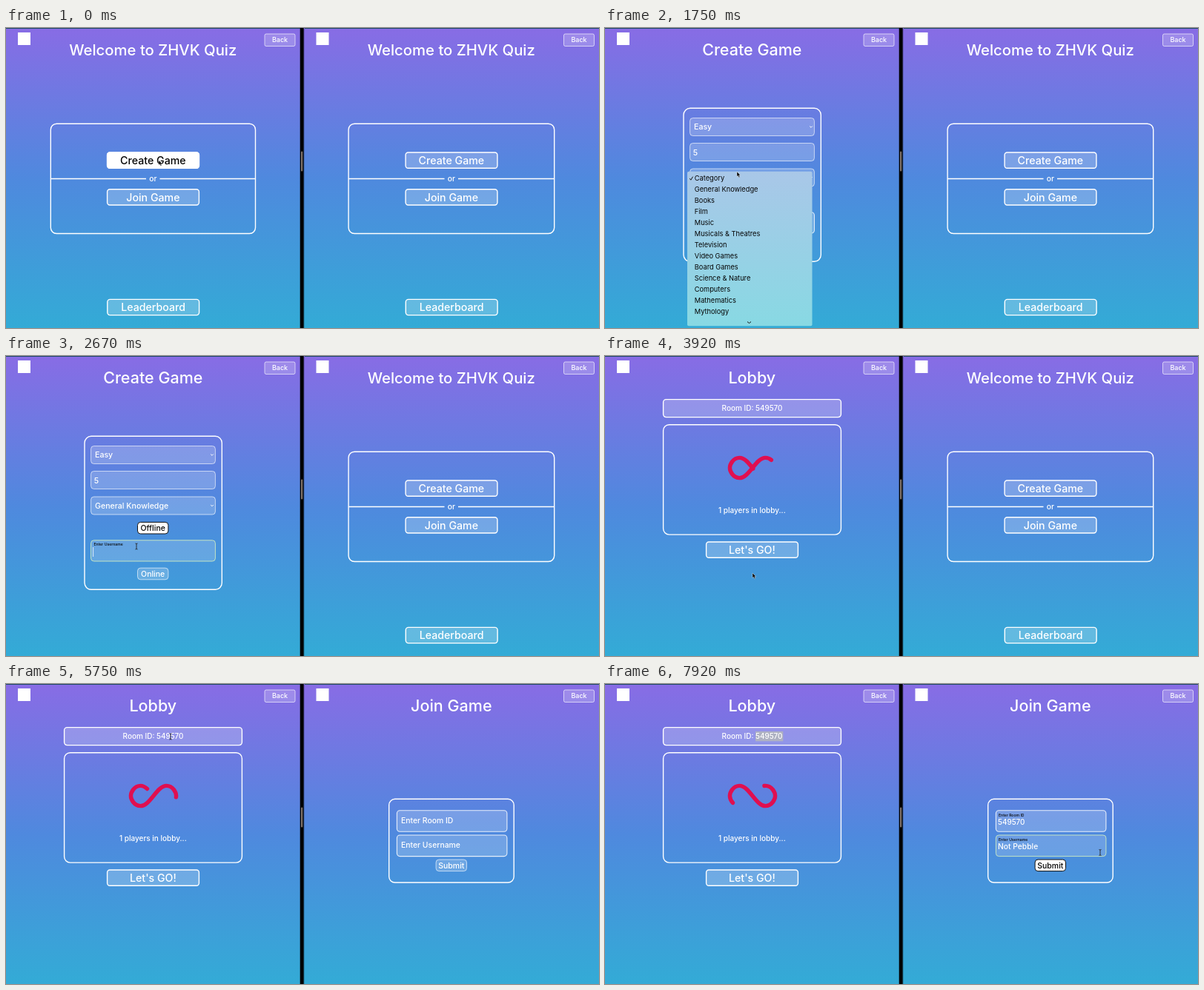
Recreate the animation shown at these times as an HTML page. Size 800x405 px, loop 8000 ms.

```html
<!DOCTYPE html>
<html lang="en">
<head>
<meta charset="utf-8">
<title>Quiz lobby</title>
<style>
  html, body { margin: 0; width: 100%; height: 100%; overflow: hidden; background: #000; }
  svg { display: block; width: 100vw; height: 100vh; font-family: Inter, "Open Sans", sans-serif; font-weight: 500; }
  text { fill: #fff; white-space: pre; }
  .mid { text-anchor: middle; }
  .end { text-anchor: end; }
  .dark { fill: #050505; }
  .menu { fill: #050505; font-weight: 400; }
  .frame { fill: none; stroke: #fff; stroke-width: 1.4; }
  .button { fill: #ffffff38; stroke: #fff; stroke-width: 1.4; }
  .field { fill: #ffffff33; stroke: #ffffffa0; stroke-width: 1; }
  .open { fill: #ffffff33; stroke: #ffffffd8; stroke-width: 1.1; }
  .focus { fill: #ffffff2b; stroke: #c3e4c4; stroke-width: 1; }
  .active { fill: #fff; stroke: #fff; stroke-width: 1.4; }
  .ready { fill: #fff; stroke: #111; stroke-width: 1; }
</style>
</head>
<body>
<svg id="stage" viewBox="0 0 800 405" preserveAspectRatio="none"></svg>
<script>
const LOOP = 8000, FRAME = 250 / 3;
const PATH_LENGTH = 256.6, GAP = 80, SPIN = 628;
const RIGHT = 402.5;

// Moments at which the interface changes
const T = {
  create: 330, levels: 660, easy: 1000, five: 1330, topics: 1670, topic: 2170,
  name: 2500, typeName: 2750, lobby: 3750, hoverJoin: 4900, join: 5170,
  select: 5830, roomFocus: 6420, paste: 6580, nick: 6830, typeNick: 6920, nickDone: 7580
};

const text = (x, y, size, str, cls = '') =>
  `<text x="${x}" y="${y}" font-size="${size}" class="${cls}">${str}</text>`;
const title = (str, size = 21.5) => text(198.3, 36.7, size, str, 'mid');
const box = (x, y, w, h, r, cls) =>
  `<rect x="${x}" y="${y}" width="${w}" height="${h}" rx="${r}" class="${cls}"/>`;
const during = (from, to, ...parts) =>
  `<g data-from="${from}" data-to="${to}">${parts.join('')}</g>`;
const typed = (x, y, str, from, to) =>
  `<text x="${x}" y="${y}" font-size="10.3" data-str="${str}" data-from="${from}" data-to="${to}"></text>`;
const caret = (x, y) => `<path d="M${x} ${y}v13" stroke="#fff" stroke-width=".8"/>`;
const chevron = (x, y) =>
  `<path d="M${x - 1.8} ${y - 1}l1.8 1.8 1.8-1.8" fill="none" stroke="#fff"/>`;

const bigButton = (x, y, label, cls = 'button') =>
  box(x + 0.4, y, 123.8, 21.2, 3.5, cls) +
  text(x + 62.2, y + 15.9, 14.2, label, cls === 'active' ? 'mid dark' : 'mid');
const smallButton = (x, y, label, ready) =>
  box(x + 0.3, y + 0.2, 41.4, 15.6, 4, ready ? 'ready' : 'field') +
  text(x + 21, y + 11.8, 10.5, label, ready ? 'mid dark' : 'mid');
const wideField = (y, h, cls) => box(114.6, y, 167.8, h, 4, cls);
const chooser = (y, label) =>
  wideField(y, 24, 'field') + text(120, y + 15.7, 10.6, label) + chevron(278, y + 12);

const chrome = backX =>
  '<rect width="398" height="405" fill="url(#sky)"/><rect width="398" height="1" fill="#1d4a63"/>' +
  '<rect x="16" y="6" width="17" height="17" fill="#fff"/>' +
  box(backX, 8, 41, 16.5, 2, 'field') + text(backX + 20.5, 19.3, 9, 'Back', 'mid');

const welcome = (width, extra) => {
  const left = 198.4 - width / 2;
  return title('Welcome to ZHVK Quiz', 20.3) +
    box(left, 129.2, width, 148.3, 8, 'frame') +
    `<path d="M${left} 203.5H189M207.5 203.5H${left + width}" class="frame"/>` +
    text(198.3, 207, 10.3, 'or', 'mid') +
    bigButton(136.2, 168, 'Create Game') + bigButton(136.2, 217.8, 'Join Game') +
    bigButton(136.4, 366.4, 'Leaderboard') + extra;
};

const menu = (y, height, fill, items) =>
  `<rect x="111" y="${y}" width="168.5" height="${height}" rx="2" fill="url(#${fill})"/>` +
  `<path d="M114.3 ${y + 9.5}l1.5 2 2.7-4.5" fill="none" stroke="#111"/>` +
  items.map((item, i) => text(120.8, y + 12.6 + i * 15, 9.25, item, 'menu')).join('');

const levels = ['Difficulty', 'Easy', 'Medium', 'Hard'];
const topics = ['Category', 'General Knowledge', 'Books', 'Film', 'Music', 'Musicals &amp; Theatres',
  'Television', 'Video Games', 'Board Games', 'Science &amp; Nature', 'Computers', 'Mathematics', 'Mythology'];

const createPage = () => during(T.create, T.lobby,
  title('Create Game'),
  box(106, 108.3, 185.3, 207, 9, 'frame'),
  during(0, T.easy, chooser(121.5, 'Difficulty')),
  during(T.easy, LOOP, chooser(121.5, 'Easy')),
  wideField(155.5, 24, 'field'),
  during(0, T.five, text(120, 171.2, 10.6, 'Number of Questions')),
  during(T.five, LOOP, text(118.7, 171.5, 10.6, '5')),
  during(0, T.topic, chooser(190, 'Category')),
  during(T.topic, LOOP, chooser(190, 'General Knowledge')),
  during(0, T.topic, smallButton(177.2, 224.2, 'Offline')),
  during(T.topic, LOOP, smallButton(177.2, 224.2, 'Offline', true)),
  during(0, T.name, wideField(248.8, 28.2, 'open'), text(120, 266.2, 10.4, 'Enter Username')),
  during(T.name, LOOP,
    wideField(248.8, 28.2, 'focus'), text(118.5, 256.2, 5.1, 'Enter Username', 'dark')),
  during(T.name, T.typeName, caret(117.6, 258)),
  typed(118, 268.3, 'Pebble', T.typeName, 3250),
  during(0, T.typeName, smallButton(177.2, 286, 'Online')),
  during(T.typeName, LOOP, smallButton(177.2, 286, 'Online', true)),
  during(T.levels, T.easy, menu(125, 64.3, 'levelFill', levels)),
  during(T.topics, T.topic, menu(193.7, 208.5, 'topicFill', topics),
    '<path d="M192 396.5l2.5 2 2.5-2" fill="none" stroke="#111"/>'));

const loop = 'M24.3 30C11.4 30 5 43.3 5 50s6.4 20 19.3 20c19.3 0 32.1-40 51.4-40' +
  'C88.6 30 95 43.3 95 50s-6.4 20-19.3 20C56.4 70 43.6 30 24.3 30z';

const lobbyPage = () => during(T.lobby, LOOP,
  title('Lobby'),
  box(78.6, 58.6, 239.8, 24, 4, 'button'),
  during(T.select, LOOP, '<rect x="203" y="64" width="37.3" height="13.3" fill="#aeb1c2"/>'),
  text(200.5, 74.3, 10, 'Room ID:', 'end'), text(203, 74.3, 9.9, '549570'),
  box(78.6, 92.7, 239.8, 148.4, 8, 'frame'),
  `<path id="spinner" d="${loop}" pathLength="${PATH_LENGTH}" transform="translate(165 117) scale(.68)"
    fill="none" stroke="#e00f50" stroke-width="8" stroke-linecap="round"
    stroke-dasharray="${PATH_LENGTH - GAP} ${GAP}"/>`,
  text(198.3, 212.3, 10, '1 players in lobby...', 'mid'),
  bigButton(136.2, 251, "Let's GO!"));

const entry = (y, label, cls) =>
  box(527.4, y, 148.5, 28.6, 4, cls) + text(531, y + 8, 5.1, label, 'dark');
const blank = (y, label) =>
  box(527.4, y, 148.5, 28.6, 4, 'open') + text(533, y + 17.2, 10.4, label);

const joinPage = () => during(T.join, LOOP,
  `<g transform="translate(${RIGHT})">${title('Join Game')}</g>`,
  box(516.7, 155.3, 168.5, 112.7, 8, 'frame'),
  during(0, T.roomFocus, blank(170.7, 'Enter Room ID')),
  during(T.roomFocus, T.nick, entry(170.7, 'Enter Room ID', 'focus')),
  during(T.nick, LOOP, entry(170.7, 'Enter Room ID', 'open')),
  during(T.roomFocus, T.paste, caret(530, 180)),
  during(T.paste, LOOP, text(530, 189.7, 9.9, '549570')),
  during(T.paste, T.nick, caret(567.8, 180)),
  during(0, T.nick, blank(204, 'Enter Username')),
  during(T.nick, LOOP, entry(204, 'Enter Username', 'focus')),
  during(T.nick, T.typeNick, caret(530, 213)),
  typed(530, 222.9, 'Not Pebble', T.typeNick, T.nickDone),
  during(0, T.typeNick, smallButton(579.8, 236.8, 'Submit')),
  during(T.typeNick, LOOP, smallButton(579.8, 236.8, 'Submit', true)));

const gradient = (id, ...colors) =>
  `<linearGradient id="${id}" x2="0" y2="1">` +
  colors.map((c, i) => `<stop offset="${i / (colors.length - 1)}" stop-color="${c}"/>`).join('') +
  '</linearGradient>';

const stage = document.getElementById('stage');
stage.innerHTML = `<defs>
    ${gradient('sky', '#886ce5', '#4f89de', '#33abd6')}
    ${gradient('levelFill', '#bfc5e2', '#abc8e3')}
    ${gradient('topicFill', '#a9c7e8', '#88d9e3')}
  </defs>
  ${chrome(349)}
  ${during(0, T.create, welcome(276.2, bigButton(136.2, 168, 'Create Game', 'active')))}
  ${createPage()}${lobbyPage()}
  <g transform="translate(${RIGHT})">${chrome(350)}
    ${during(0, T.join, welcome(277.6,
      during(T.hoverJoin, T.join, bigButton(136.2, 217.8, 'Join Game', 'active'))))}
  </g>
  ${joinPage()}
  <rect x="396.7" width="5" height="405"/>
  <rect x="401.7" width="1" height="405" fill="url(#sky)"/>
  <rect x="398" y="166.5" width="2.2" height="27" rx="1" fill="#80746c"/>
  <g id="pointer">
    <circle id="ring" r="8.3" cy="-.5" fill="#ffffff30" stroke="#0b1020" stroke-width="1.5"/>
    <path id="arrow" d="M0 0v6.5l1.5-1.3 1.2 2.6 1.2-.6-1.2-2.5h2z" fill="#000" stroke="#fff" stroke-width=".4"/>
    <path id="beam" d="M-1.5-4Q0-4 0-3V3Q0 4-1.5 4M1.5-4Q0-4 0-3M0 3Q0 4 1.5 4" fill="none" stroke="#222" stroke-width=".9"/>
  </g>`;

// Pointer stops: time, x, y
const stops = [
  [0, 206, 178.5], [330, 206, 178.5], [580, 176, 134], [660, 176, 134], [830, 174.5, 153],
  [950, 174, 150], [1170, 178, 168], [1400, 178, 168], [1600, 178, 194], [1800, 178, 194],
  [2080, 178, 218], [2170, 178, 218], [2460, 176, 257], [3280, 176, 257], [3500, 199, 293],
  [3920, 199, 293], [4600, 620, 228], [5150, 620, 228], [5700, 222, 71], [5900, 222, 71],
  [6380, 585, 186], [6560, 585, 186], [6750, 580, 216], [6900, 580, 216], [7100, 668, 227.5]
];
const clicks = [170, 580, 1580, 3580, 4830];
const beams = [[1170, 1450], [2420, 3330], [5650, 6000], [6330, LOOP]];

const $ = id => document.getElementById(id);
const within = (t, [from, to]) => t >= from && t < to;
const timed = [...stage.querySelectorAll('g[data-from]')];
const typing = [...stage.querySelectorAll('[data-str]')];

function pointerAt(t) {
  const next = stops.findIndex(s => s[0] > t);
  if (next < 0) return stops.at(-1).slice(1);
  const a = stops[next - 1], b = stops[next];
  const u = (t - a[0]) / (b[0] - a[0]), k = u * u * (3 - 2 * u);
  return [a[1] + (b[1] - a[1]) * k, a[2] + (b[2] - a[2]) * k];
}

const show = (el, on) => { el.style.display = on ? '' : 'none'; };

function draw(t) {
  for (const el of timed) show(el, within(t, [+el.dataset.from, +el.dataset.to]));
  for (const el of typing) {
    const { str, from, to } = el.dataset;
    const done = (t - from) / (to - from);
    el.textContent = done < 0 ? '' : str.slice(0, 1 + Math.floor(done * (str.length - 1)));
  }
  const gapStart = 24 - (t - 4830) / SPIN * PATH_LENGTH;
  $('spinner').setAttribute('stroke-dashoffset', -(gapStart + GAP) % PATH_LENGTH);
  $('pointer').setAttribute('transform', `translate(${pointerAt(t)})`);
  const beam = beams.some(span => within(t, span));
  show($('beam'), beam);
  show($('arrow'), !beam);
  show($('ring'), clicks.some(c => Math.abs(t - c) < 50));
}

const start = performance.now();
function tick() {
  const t = (performance.now() - start) % LOOP;
  draw(Math.floor((t + 4) / FRAME) * FRAME % LOOP);
  requestAnimationFrame(tick);
}
tick();
</script>
</body>
</html>
```
